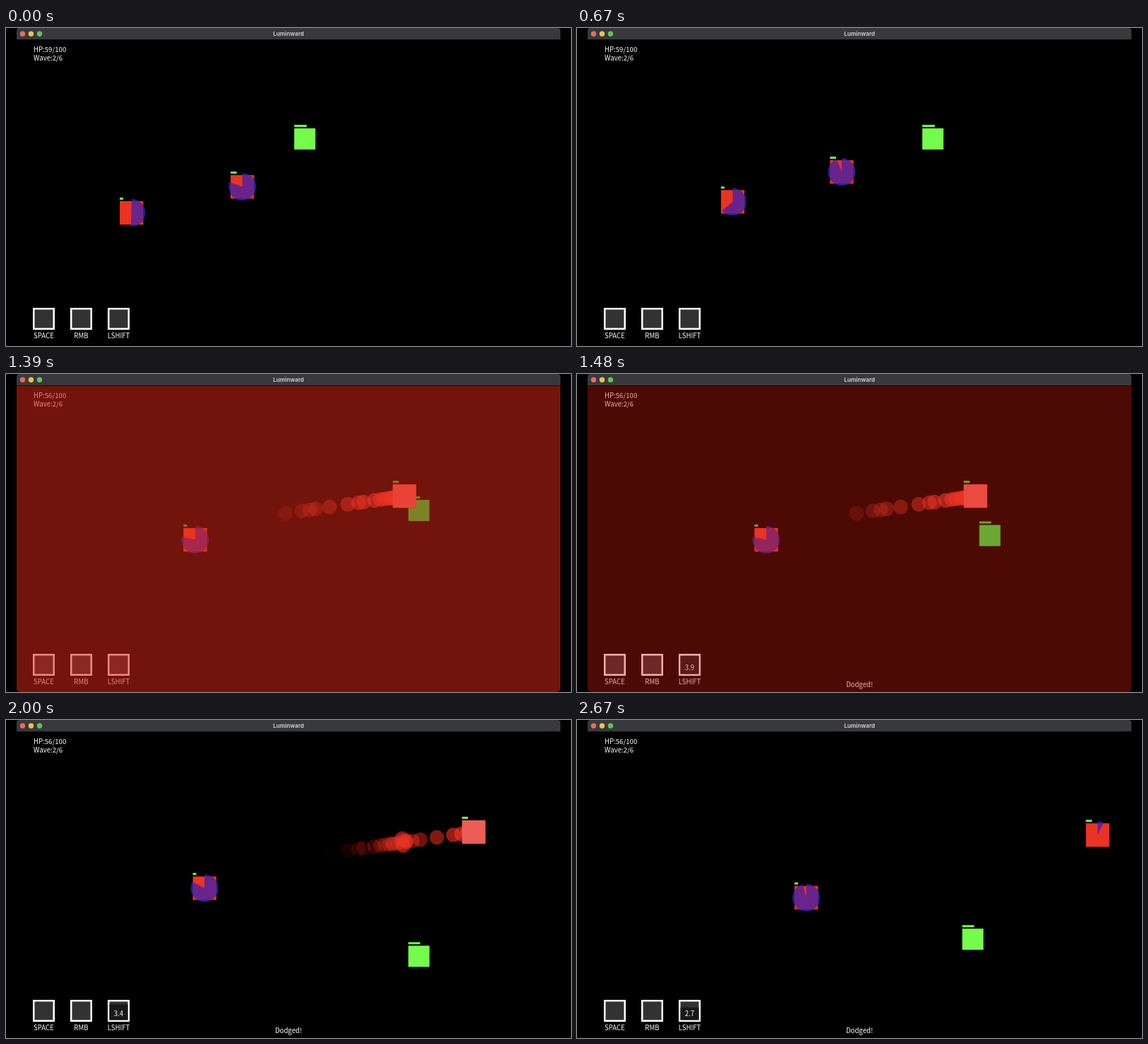
An HTML page with a canvas for the animation above (2700 ms loop, 800 by 450 pixels).

```html
<!DOCTYPE html>
<html lang="en">
<head>
<meta charset="utf-8">
<title>Luminward</title>
<style>
  html, body { margin: 0; width: 100%; height: 100%; overflow: hidden; background: #000; }
  canvas { display: block; width: 800px; height: 450px; filter: url(#wide); }
  svg { position: absolute; }
</style>
</head>
<body>
<!-- Shows sRGB colours in wide-gamut values -->
<svg width="0" height="0">
  <filter id="wide" x="0" y="0" width="1" height="1" color-interpolation-filters="linearRGB">
    <feColorMatrix values=".8225 .1774 0 0 0  .0332 .9669 0 0 0  .0171 .0724 .9108 0 0  0 0 0 1 0"/>
  </filter>
</svg>
<canvas id="stage" width="800" height="450"></canvas>
<script>
const ctx = document.getElementById('stage').getContext('2d');
const LOOP = 2700;
const HIT = 1375, DASH = 1402, FREEZE = 1390, RESUME = 1800;
// Enemy clock
const CHARGED = 990, LUNGE = 1067, LUNGE_END = 1790, RECHARGE = 1900;
const WALK = 120.6, CHASE = 68, CHARGE_RATE = 0.0002;
const RED = '#f00', HOT = '#ff4f4f', GREEN = '#0f0';
const SIZE = 33.3, HALF = 16.6;
const FONT = '9.65px "Noto Sans CJK JP", "Noto Sans CJK SC", "Noto Sans", sans-serif';

const clamp = (v, lo, hi) => Math.min(hi, Math.max(lo, v));
// Seconds of the span a..b that have passed
const held = (t, a, b) => (clamp(t, a, b) - a) / 1000;
// Enemies stand still during the dodge
const enemyTime = t => t - 1000 * held(t, FREEZE, RESUME);
const realTime = g => g > FREEZE ? g + RESUME - FREEZE : g;

function player(t) {
  const back = WALK * held(t, 2470, 2670);
  return [
    408 + WALK * held(t, 0, 1340) - back,
    142 + WALK * (held(t, 1020, 1320) + held(t, 1613, 2000)) + 448 * held(t, DASH, 1613) - back
  ];
}

// Walks from a point towards the player, in enemy time
function chase([x, y], from, to) {
  const step = 10;
  for (let g = from; g < to; g += step) {
    const [px, py] = player(realTime(g));
    const dx = px + 15 - x - HALF, dy = py + 15 - y - HALF;
    const k = CHASE * Math.min(step, to - g) / 1000 / Math.hypot(dx, dy);
    x += dx * k;
    y += dy * k;
  }
  return [x, y];
}

// The lunge slows a little: d = SPEED * s - DRAG * s * s
const SPEED = 543, DRAG = 65, SLOPE = 0.145;
const launch = chase([318, 208.2], 0, CHARGED);
const lungeTime = d => LUNGE + 1000 * (SPEED - Math.sqrt(SPEED * SPEED - 4 * DRAG * d)) / (2 * DRAG);
function lunge(g) {
  const s = held(g, LUNGE, LUNGE_END);
  const d = SPEED * s - DRAG * s * s;
  return [launch[0] + d, launch[1] - d * SLOPE];
}

const walker = g => chase([161, 245], 0, g);
function charger(g) {
  if (g < CHARGED) return chase([318, 208.2], 0, g);
  return g < RECHARGE ? lunge(g) : chase(lunge(RECHARGE), RECHARGE, g);
}

const puffs = [];
function puff(d) {
  puffs.push({ x: launch[0] + HALF + d, y: launch[1] + HALF - d * SLOPE, born: lungeTime(d) });
}
for (let k = 0; k < 21; k++) puff(16.5 * k + 7 * Math.sin(1.45 * k));
for (let d = 135; d < 168; d += 6) puff(d);
for (let i = 0; i < 6; i++) {
  puffs.push({ x: 563 + 3 * Math.cos(2 * i), y: 172 + 6 * Math.sin(2 * i), born: FREEZE });
}

function rect(x, y, w, h, color) {
  ctx.fillStyle = color;
  ctx.fillRect(x, y, w, h);
}

function disc(x, y, r, color) {
  ctx.fillStyle = color;
  ctx.beginPath();
  ctx.arc(x, y, r, 0, Math.PI * 2);
  ctx.fill();
}

function panel(y, h, corners, color) {
  ctx.fillStyle = color;
  ctx.beginPath();
  ctx.roundRect(15, y, 770, h, corners);
  ctx.fill();
}

function label(text, x, y, align = 'center', color = '#fff', font = FONT) {
  ctx.font = font;
  ctx.textAlign = align;
  ctx.fillStyle = color;
  ctx.fillText(text, x, y);
}

function unit([x, y], size, life, color) {
  rect(x, y, size, size, color);
  rect(x, y - 5, life, 3, GREEN);
}

function pie([x, y], part) {
  const cx = x + HALF, cy = y + HALF;
  ctx.fillStyle = 'rgba(54,44,205,.7)';
  ctx.beginPath();
  ctx.moveTo(cx, cy);
  ctx.arc(cx, cy, 19.5, -Math.PI / 2, (part * 2 - 0.5) * Math.PI);
  ctx.fill();
}

function drawTrail(g) {
  for (const p of puffs) {
    if (g <= p.born) continue;
    ctx.globalAlpha = Math.max(0, 0.75 - 0.0018 * (g - p.born));
    disc(p.x, p.y, 10.4, RED);
  }
  ctx.globalAlpha = 1;
}

function drawWalker(g) {
  const pos = walker(g);
  unit(pos, SIZE, 5, RED);
  pie(pos, 0.507 + g * CHARGE_RATE);
}

function drawCharger(g) {
  const pos = charger(g);
  const lunging = g >= CHARGED && g < RECHARGE;
  unit(pos, SIZE, 8.5, lunging ? HOT : RED);
  if (!lunging) pie(pos, g < CHARGED ? 0.806 + g * CHARGE_RATE : (g - RECHARGE) * CHARGE_RATE);
}

function skill(name, cx, cooldown) {
  rect(cx - 15.5, 396, 31, 31, '#fff');
  rect(cx - 13, 398.5, 26, 26, '#323232');
  if (cooldown > 0) {
    const h = 26 * cooldown / 4;
    rect(cx - 13, 424.5 - h, 26, h, '#181818');
    label(cooldown.toFixed(1), cx, 419.2);
  }
  label(name, cx, 438.5);
}

function drawHud(t) {
  label(`HP:${t < HIT ? 59 : 56}/100`, 39, 34.1, 'left');
  label('Wave:2/6', 39, 46.2, 'left');
  skill('SPACE', 53.5, 0);
  skill('RMB', 106.5, 0);
  skill('LSHIFT', 159.5, t < DASH ? 0 : 4 - (t - DASH) / 1000);
  if (t >= DASH) label('Dodged!', 400, 443.2);
}

function drawFlash(t) {
  const alpha = 0.516 - (t - HIT) * 0.00171;
  if (t >= HIT && alpha > 0) panel(17, 433, [0, 0, 5, 5], `rgba(255,0,0,${alpha})`);
}

function drawTitleBar() {
  panel(0, 16.2, [4, 4, 0, 0], '#38393d');
  ['#ff5f57', '#febc2e', '#28c840'].forEach((c, i) => disc(23.5 + 12 * i, 8.3, 3.7, c));
  label('Luminward', 400, 10.8, 'center', '#c8c8ca', '700 8px Inter, sans-serif');
}

function draw(t) {
  const g = enemyTime(t);
  rect(0, 0, 800, 450, '#000');
  unit(player(t), 30, t < HIT ? 17.7 : 16.8, GREEN);
  drawTrail(g);
  drawWalker(g);
  drawCharger(g);
  drawHud(t);
  drawFlash(t);
  drawTitleBar();
}

const start = performance.now();
function tick(now) {
  draw(Math.max(0, now - start) % LOOP);
  requestAnimationFrame(tick);
}
draw(0);
requestAnimationFrame(tick);
</script>
</body>
</html>
```
